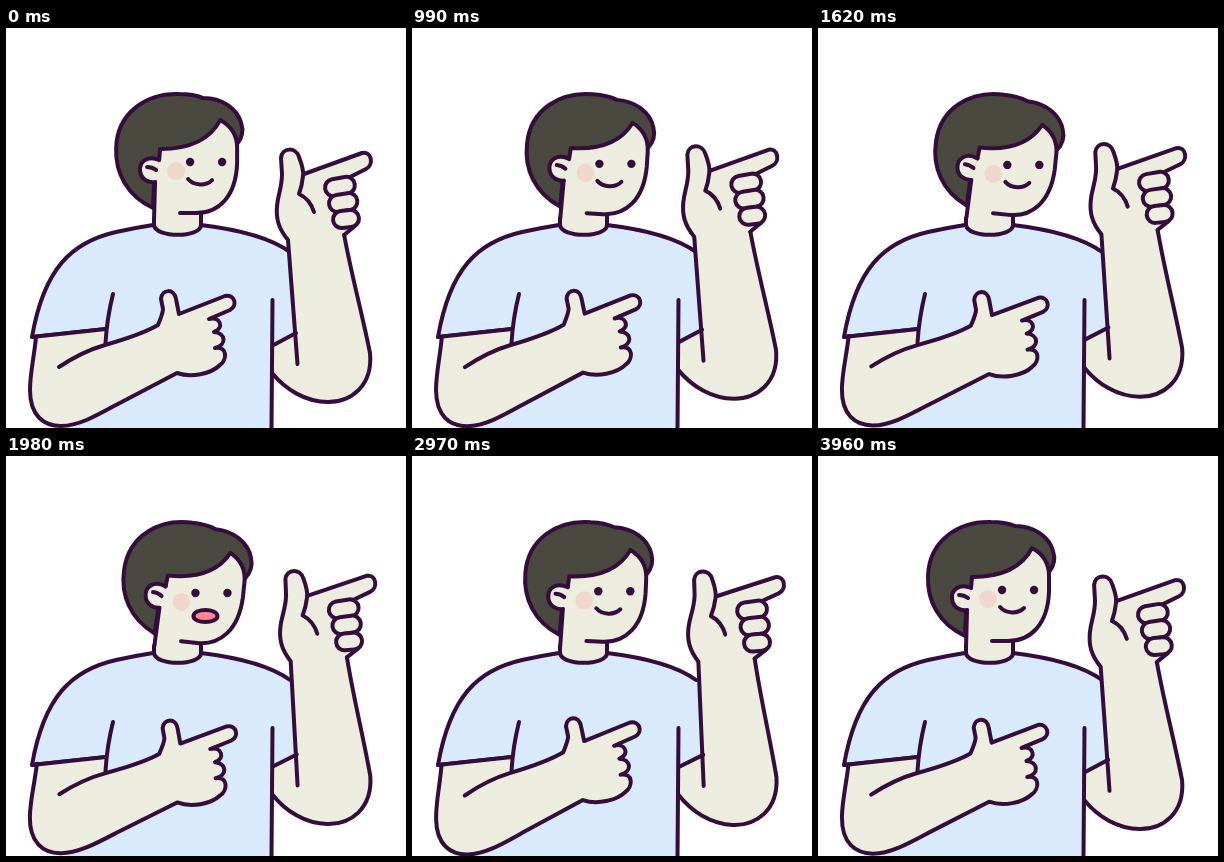
An HTML page that plays this animation: 400x400 px, repeating every 4050 ms.

```html
<!DOCTYPE html>
<html lang="en">
<head>
<meta charset="utf-8">
<title>Pointing man</title>
<style>
  html, body { margin: 0; width: 100%; height: 100%; overflow: hidden; background: #fff; }
  svg { display: block; width: 100%; height: 100%; }
  path, line, rect { fill: none; stroke: #350d3d; stroke-width: 4; stroke-linecap: round; stroke-linejoin: round; }
  .skin { fill: #ecedde; }
  .shirt { fill: #d9eafd; }
  .hair { fill: #4a493f; }
  .bare { stroke: none; }
  .eye { fill: #350d3d; }
  .blush { fill: #f0d7cd; }
  #mouth { fill: #ff858f; }
</style>
</head>
<body>
<svg viewBox="0 0 400 400">
  <!-- shirt and neck -->
  <path class="shirt bare" d="M26 309C38 240 66 214 110 204L148 197H195C228 201 258 209 284 224L300 300L266 318L265 400H60L100 301Z"/>
  <path d="M100 301L26 309C38 240 66 214 110 204Q128 200 147 197"/>
  <path d="M195 197C228 201 262 208 284 224"/>
  <path class="skin bare" d="M148 170V195C148 211 195 211 195 195V170Z"/>
  <path d="M148 190V197C149 210 195 210 195 197V185"/>

  <g id="head">
    <path class="hair" d="M147 180C121 168 109 145 110 120C111 85 140 65 173 66C184 66 192 68 197 70C215 70 231 80 235 95C238 104 235 111 231 116L200 140L148 155Z"/>
    <path class="skin bare" d="M154 121C182 121 203 113 214 92C225 98 231 108 231 120V135C230 168 213 185 190 185L190 192H148V154L153 132Z"/>
    <path d="M148 192L149 154M174 185H190C213 185 230 168 231 135V120C231 108 225 98 214 92C203 113 182 121 154 121L153 132"/>
    <path class="skin" d="M153 132C141 127 133 134 134 143C135 152 143 155 149 154"/>
    <path d="M141 139Q146 139 150 142"/>
  </g>

  <g id="face">
    <circle class="blush" cx="170" cy="143" r="9"/>
    <g id="eyes">
      <circle class="eye" cx="184" cy="134" r="4.2"/>
      <circle class="eye" cx="216" cy="134" r="4.2"/>
    </g>
    <path id="mouth"/>
  </g>

  <g id="rightArm">
    <path class="skin bare" d="M282 210L338 204C345 245 356 285 364 325C367 358 345 374 322 374C300 374 280 362 266 345L258 338V322L290 305Z"/>
    <path d="M338 206C345 245 356 285 364 325C367 358 345 374 322 374C300 374 280 362 266 345L262 341M262 320L290 305"/>
    <path class="skin bare" d="M282 212C272 200 270 190 271 178C272 166 276 160 276 146L275 130C276 119 290 119 293 129L298 146L356 125C366 123 368 137 360 141L344 149L352 195L338 207Z"/>
    <path d="M291.500 336L282 212C272 200 270 190 271 178C272 166 276 160 276 146L275 130C276 119 290 119 293 129Q298 142 297 148Q296 158 293 166Q304 171 308 184"/>
    <path d="M298 146L356 125C366 123 368 137 360 141L342 150M349 198L338 207"/>
    <rect class="skin" x="319" y="150" width="30" height="17" rx="8.500" transform="rotate(-10 334 159)"/>
    <rect class="skin" x="323" y="166" width="28.500" height="17" rx="8.500" transform="rotate(-9 337 175)"/>
    <rect class="skin" x="327" y="182.500" width="26" height="17" rx="8.500" transform="rotate(-6 340 191)"/>
  </g>

  <!-- torso edge in front of the raised arm -->
  <path class="shirt bare" d="M250 272H266.500L265.500 400H250Z"/>
  <path d="M266.500 272L265.500 402"/>

  <g id="leftArm">
    <path class="skin bare" d="M30 309L100 301L99 317C120 311 140 304 152 297L157 283L155 271C156 261 168 260 170 271L173 286L219 268C229 266 232 278 224 282L203 291C214 288 219 300 208 304C220 305 221 317 209 320C222 318 221 332 214 337C205 346 185 350 171 345L110 377C90 388 72 398 55 398C38 398 24 388 24 362C24 345 28 330 30 309Z"/>
    <path d="M53 339C68 329 85 321 99 317C120 311 140 304 152 297Q157 285 157 281L155 271C156 261 168 260 170 271L173 286L219 268C229 266 232 278 224 282L203 291C214 288 219 300 208 304C220 305 221 317 209 320C222 318 221 332 214 337C205 346 185 350 171 345L110 377C90 388 72 398 55 398C38 398 24 388 24 362C24 345 28 330 30 309"/>
  </g>
  <path d="M26 309L100 301M107 266Q101 290 99.500 315"/>
</svg>
<script>
const LOOP = 4050, STEP = 90;
const el = id => document.getElementById(id);
const place = (id, value) => el(id).setAttribute("transform", value);

// Linear value at time t along [time, value] keys
function track(t, keys) {
  const i = Math.max(1, keys.findIndex(k => k[0] >= t));
  const [t0, a] = keys[i - 1], [t1, b] = keys[i];
  return a + (b - a) * (t - t0) / (t1 - t0);
}

const lift = [[0, 0], [540, -1.5], [1350, -4.7], [1980, -6], [2520, -6], [3330, -4.5], [3960, -1], [LOOP, 0]];
const turn = [[0, 0], [1080, .1], [1350, .2], [1980, 1.2], [2520, 2.1], [2880, 2.1], [3330, 1.3], [3960, .3], [LOOP, 0]];
const wave = [[0, 0], [540, -1.4], [1350, .6], [1980, 1.1], [2520, .2], [3330, -1.4], [3960, .5], [LOOP, 0]];
const laugh = [[0, 0], [270, 0], [450, 1], [720, 1], [900, 0], [LOOP, 0]];
const talk = [[0, 0], [1800, 0], [1980, 1], [2160, 1], [2340, 0], [LOOP, 0]];
const blink = [[0, 1], [360, 1], [450, .1], [630, .1], [720, 1], [LOOP, 1]];

// left y, right y, top pull, bottom pull, inset of top and bottom pulls
const SMILE = [151, 152, 158, 158, 6, 6];
const LAUGH = [152, 149, 151, 172, 6, 3];
const TALK = [157, 157, 149, 165, 0, 0];

function mouthPath(l, k) {
  const [a, b, top, low, i, j] = SMILE.map((v, n) => v + (LAUGH[n] - v) * l + (TALK[n] - v) * k);
  return `M182 ${a}C${182 + i} ${top} ${206 - i} ${top} 206 ${b}C${206 - j} ${low} ${182 + j} ${low} 182 ${a}Z`;
}

function draw(now) {
  const t = Math.floor(now % LOOP / STEP) * STEP;
  const sway = .5 + .5 * Math.cos((t - 1850) / LOOP * 2 * Math.PI);
  place("head", `rotate(${6 * sway} 172 195)`);
  place("face", `translate(${5.5 * sway} ${3 * sway})`);
  place("eyes", `translate(0 134) scale(1 ${track(t, blink)}) translate(0 -134)`);
  place("rightArm", `translate(0 ${track(t, lift)}) rotate(${track(t, turn)} 318 340)`);
  place("leftArm", `rotate(${track(t, wave)} 95 355)`);
  el("mouth").setAttribute("d", mouthPath(track(t, laugh), track(t, talk)));
}

const start = performance.now();
function tick() {
  draw(performance.now() - start);
  requestAnimationFrame(tick);
}
tick();
</script>
</body>
</html>
```
